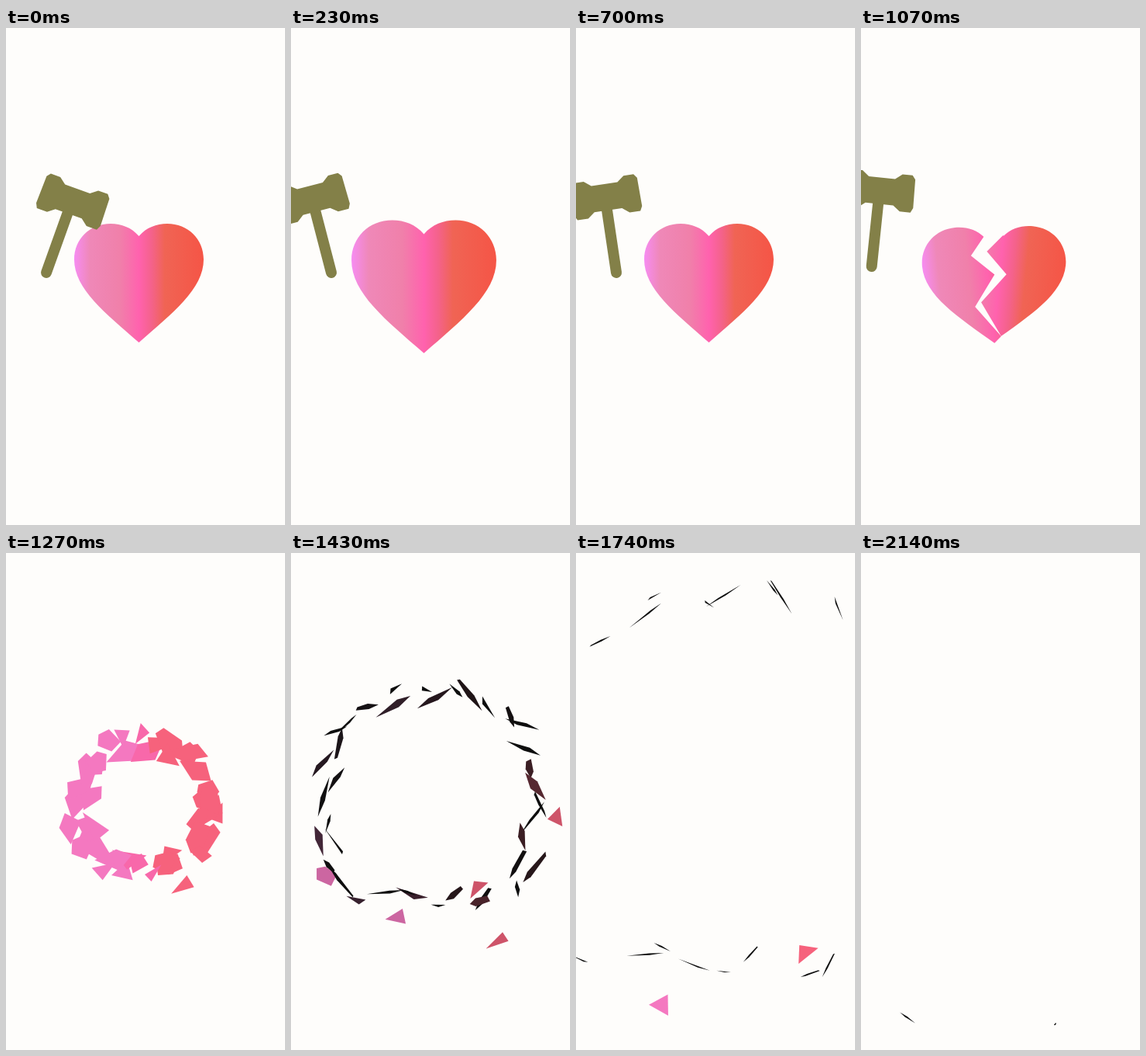
These frames come from a looping animation (360 by 640 pixels, 2180 ms). An HTML page with a canvas:

```html
<!DOCTYPE html>
<html>
<head>
<meta charset="utf-8">
<style>
html, body { margin: 0; width: 100%; height: 100%; overflow: hidden; background: #fefdfb; }
canvas { display: block; width: 360px; height: 640px; }
</style>
</head>
<body>
<canvas id="stage" width="360" height="640"></canvas>
<script>
const g = document.getElementById('stage').getContext('2d');
const LOOP = 2180, BACK = 430, HIT = 810, BURST = 1180, SPREAD = 250;
const CX = 172, CY = 329;
const clamp = v => Math.max(0, Math.min(1, v));
const smooth = v => { v = clamp(v); return v * v * (3 - 2 * v); };
const bump = v => Math.sin(Math.PI * clamp(v)) ** 2;
const rad = deg => deg * Math.PI / 180;

let seed = 11;
const rand = () => (seed = seed * 16807 % 2147483647) / 2147483647;
const vary = range => (rand() - .5) * range;

const heart = new Path2D('M171.5 268C162 257 149 252 135 252C108 252 88 272 88 298' +
  'C88 336 128 367 171.5 405C215 367 255 336 255 298C255 272 235 252 208 252C194 252 181 257 171.5 268Z');
const crack = 'L171 267L152 290L180 317L151 356L181 397';
const leftSide = new Path2D('M40 200L171 200' + crack + 'L181 450L40 450Z');
const rightSide = new Path2D('M310 200L171 200' + crack + 'L181 450L310 450Z');
const paint = g.createLinearGradient(88, 0, 255, 0);
[[0, '#f68cf2'], [.12, '#ef88b8'], [.35, '#f080aa'], [.5, '#ff62ae'],
 [.6, '#f4628a'], [.7, '#f06454'], [1, '#f55546']].forEach(s => paint.addColorStop(...s));

// Half of the hammer head, mirrored to give the whole outline.
const half = [[17, -115], [26, -122], [39, -122], [43, -117], [44, -80], [41, -74], [27, -74], [18, -81]];
const head = [...half, ...half.map(([x, y]) => [-x, y]).reverse()];

// Each shard flies in a straight line from inside the heart through (x, y).
function makeShard(x, y, bright) {
  const jitter = bright ? 0 : 40, corners = 3 + Math.floor(rand() * 3);
  return {
    x, y, bright,
    homeX: CX + (x - CX) * .35 + vary(jitter),
    homeY: CY + (y - CY) * .35 + vary(jitter),
    color: x < 150 ? [244, 120, 192] : x < 200 ? [248, 104, 170] : [246, 98, 124],
    len: bright ? 30 : 20 + rand() * 30,
    angle: Math.atan2(y - CY, x - CX) + Math.PI / 2 + vary(1.2),
    spin: vary(.4),
    tilt: 1.08 + .4 * Math.sqrt(rand()),
    outline: Array.from({ length: corners }, (_, i) => {
      const a = (i + vary(.5)) * 2 * Math.PI / corners;
      return [.55 * Math.cos(a), .55 * Math.sin(a)];
    })
  };
}

// A few pieces stay facing the viewer; the rest form a squarish ring.
const shards = [[138, 469], [242, 433], [265, 500], [341, 338], [46, 416]]
  .map(([x, y]) => makeShard(x, y, true));
for (let i = 0; i < 38; i++) {
  const a = (i + vary(.9)) * 2 * Math.PI / 38, c = Math.cos(a), s = Math.sin(a);
  const r = (130 + vary(24)) / (c ** 4 + s ** 4) ** .25;
  shards.push(makeShard(178 + r * c, 317 + r * s, false));
}

function trace(points, sx = 1, sy = 1) {
  g.beginPath();
  points.forEach(([x, y]) => g.lineTo(x * sx, y * sy));
  g.closePath();
}

function drawHeartSide(clip, deg) {
  g.save();
  g.translate(181, 397);
  g.rotate(rad(deg));
  g.translate(-181, -397);
  if (clip) g.clip(clip);
  g.fill(heart);
  g.restore();
}

function drawHeart(t) {
  const s = 1 + (t < HIT ? .12 * bump(t / 490) : .1 * bump((t - HIT) / 240));
  const open = 5.5 * smooth((t - 850) / 200);
  g.save();
  g.translate(171.5, 290);
  g.scale(s, s);
  g.translate(-171.5, -290);
  g.fillStyle = paint;
  if (open) {
    drawHeartSide(leftSide, -open);
    drawHeartSide(rightSide, open);
  } else drawHeartSide(null, 0);
  g.restore();
}

function drawHammer(t) {
  let angle, leave = 0;
  if (t < BACK) angle = -18.4 + 38.4 * (1 - t / BACK) ** 3;
  else if (t < HIT) angle = -18.4 + 38.4 * ((t - BACK) / (HIT - BACK)) ** 4;
  else {
    leave = (t - HIT) / 260;
    angle = 20 - 14 * leave;
  }
  g.save();
  g.translate(52 - 38 * leave * leave, 315 - 8 * leave);
  g.rotate(rad(angle));
  g.fillStyle = g.strokeStyle = '#838048';
  g.lineWidth = 14;
  g.lineCap = 'round';
  g.beginPath();
  g.moveTo(0, 0);
  g.lineTo(0, -85);
  g.stroke();
  g.translate(1.5, 0);
  trace(head);
  g.fill();
  g.restore();
}

// Tilting away from the viewer makes a shard both narrower and darker.
function drawShard(s, t) {
  const u = (t - BURST) / SPREAD;
  const tilt = s.bright ? .8 * Math.sin(u * Math.PI / 2)
    : Math.min(1.5, s.tilt * Math.min(u, 1) + .25 * Math.max(0, u - 1));
  const face = Math.cos(tilt), light = clamp((face - .2) / .6);
  g.save();
  g.translate(s.homeX + (s.x - s.homeX) * u, s.homeY + (s.y - s.homeY) * u);
  g.rotate(s.angle + s.spin * u);
  trace(s.outline, s.len, 30 * face);
  g.fillStyle = `rgb(${s.color.map(c => 14 + (c - 14) * light)})`;
  g.fill();
  g.restore();
}

function draw(t) {
  g.fillStyle = '#fefdfb';
  g.fillRect(0, 0, 360, 640);
  if (t < BURST) drawHeart(t);
  else {
    g.save();
    g.beginPath();
    g.rect(0, 32, 360, 576);
    g.clip();
    shards.forEach(s => drawShard(s, t));
    g.restore();
  }
  if (t < 1320) drawHammer(t);
}

const start = performance.now();
function tick() {
  draw((performance.now() - start) % LOOP);
  requestAnimationFrame(tick);
}
tick();
</script>
</body>
</html>
```
